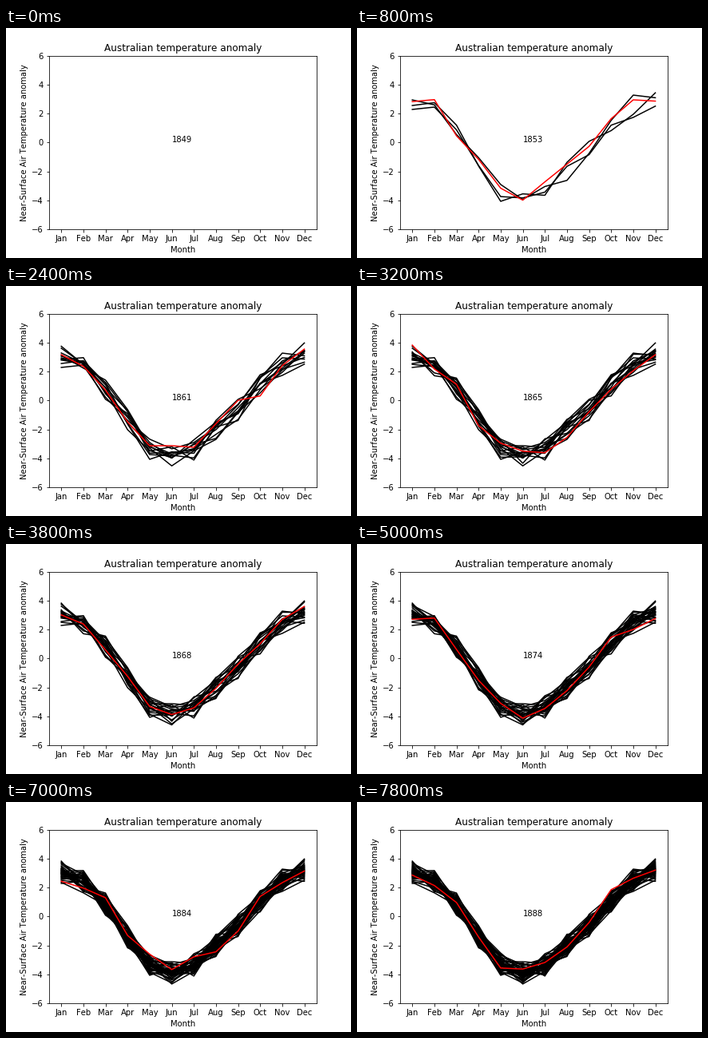
A matplotlib script for the animation above (8000 ms loop, 432 px wide and 288 px high).

```python
import numpy as np
import matplotlib.pyplot as plt
from matplotlib.animation import FuncAnimation

FIRST, FRAMES = 1849, 40
MONTHS = "Jan Feb Mar Apr May Jun Jul Aug Sep Oct Nov Dec".split()

# Mean seasonal cycle, one point per month
CYCLE = np.array([3.05, 2.4, 0.85, -1.4, -3.3, -3.9, -3.35, -2.0, -0.62, 1.08, 2.5, 3.2])


def yearly_curves(count, seed=7):
    """Seasonal cycle plus shuffled deviations, dense near the mean."""
    rng = np.random.default_rng(seed)
    u = np.linspace(-1, 1, count)
    spread = 0.4 * u + 0.37 * u**3
    noise = rng.permuted(np.tile(spread, (12, 1)), axis=1)
    return CYCLE + noise.T


plt.rcParams.update({
    "font.family": "DejaVu Sans",
    "text.kerning_factor": 6,  # whole-pixel letter spacing
})
fig = plt.figure(figsize=(6, 4), dpi=72, facecolor="white")
ax = fig.add_axes([0.125, 0.125, 0.775, 0.755])
ax.set_title("Australian temperature anomaly")
ax.set_xlabel("Month")
ax.set_ylabel("Near-Surface Air Temperature anomaly")
ax.set_xticks(range(12), MONTHS)
ax.set_xlim(-0.55, 11.55)
ax.set_ylim(-6, 6)

lines = [ax.plot(curve, lw=1.5)[0] for curve in yearly_curves(FRAMES - 1)]
label = ax.text(5, 0, "")


def draw(i):
    for k, line in enumerate(lines, 1):
        line.set_visible(k <= i)
        line.set_color("red" if k == i else "black")
    label.set_text(str(FIRST + i))
    return [*lines, label]


anim = FuncAnimation(fig, draw, frames=FRAMES, interval=200, repeat=True, repeat_delay=0)
plt.show()
```
